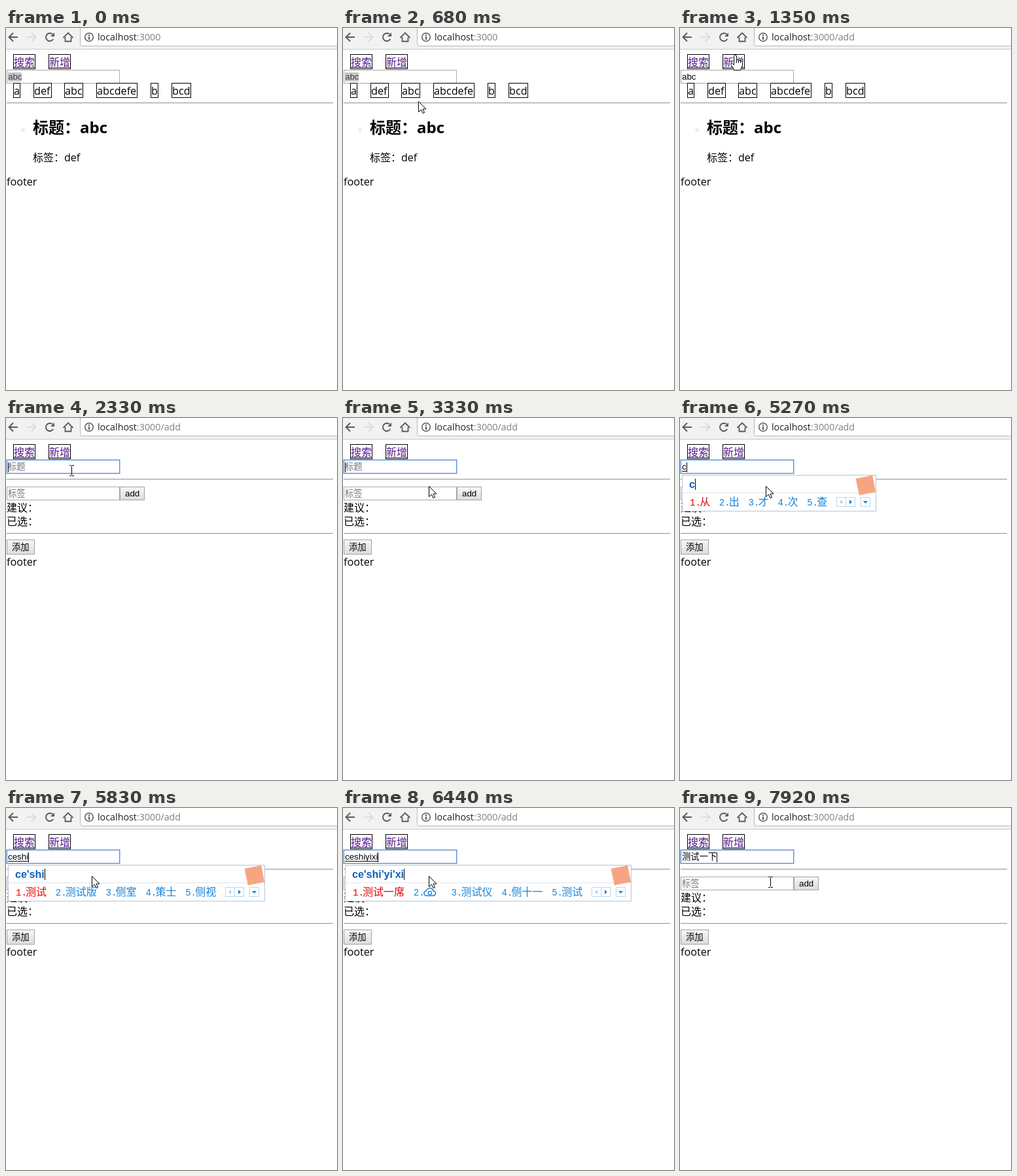
Recreate the animation shown at these times as an HTML page with a canvas. Size 506 by 554 pixels, loop 8000 ms.

```html
<!DOCTYPE html>
<html lang="zh-CN">
<head>
<meta charset="utf-8">
<style>
html, body { margin: 0; width: 100%; height: 100%; overflow: hidden; background: #fff; }
canvas { display: block; }
</style>
</head>
<body>
<canvas id="stage" width="506" height="554"></canvas>
<script>
const ctx = document.getElementById('stage').getContext('2d');
const LOOP = 8000;
const UI = '"Open Sans", "Noto Sans CJK SC", "Noto Sans CJK", sans-serif';
const FIELD = '"Liberation Sans", "Noto Sans CJK SC", "Noto Sans CJK", sans-serif';
const BODY = '16.2px ' + UI, CJK = '16px ' + UI, INPUT = '13.333px ' + FIELD;
const BLUE = '#1583d8';

// Event times in ms
const PRESS = 1220, ROUTE = 1350, FORM = 1390, FOCUS = 2330, TYPE = 5270, COMMIT = 6750;

// Start time, pinyin, candidates ("~" is the cloud icon)
const typing = [
  [TYPE, 'c', '从 出 才 次 查'],
  [5420, 'ce', '测 侧 册 策 厕'],
  [5600, "ce's", '测试 厕所 测算 侧身 测速'],
  [5720, "ce'sh", '测试 侧身 测绘 策试 厕所'],
  [5830, "ce'shi", '测试 测试版 侧室 策士 侧视'],
  [6060, "ce'shi'y", '测试仪 测试员 测试页 测试用 测试源'],
  [6210, "ce'shi'yi", '测试一 ~ 测试仪 侧十一 测试'],
  [6330, "ce'shi'yi'x", '测试一下 ~ 测试仪 侧十一 测试'],
  [6440, "ce'shi'yi'xi", '测试一席 ~ 测试仪 侧十一 测试'],
  [6520, "ce'shi'yi'xia", '测试一下 测试以下 测试 策士 侧视'],
];

// Pointer path: time, x, y
const path = [
  [160, 415, 545], [400, 300, 345], [650, 128, 125], [800, 66, 60], [960, 77, 43],
  [1029, 77, 43], [1030, 84, 41], [1769, 84, 41], [1900, 92, 58], [2060, 99, 78],
  [2180, 101, 83], [2320, 100, 80], [2639, 100, 80], [2780, 137, 101], [2870, 131, 104],
  [7719, 131, 104], [7910, 138, 113],
];

function text(str, x, y, font = BODY, color = '#000') {
  ctx.font = font;
  ctx.fillStyle = color;
  ctx.fillText(str, x, y);
  return ctx.measureText(str).width;
}

function rect(x, y, w, h, color) {
  ctx.fillStyle = color;
  ctx.fillRect(x, y, w, h);
}

function frame(x, y, w, h, color) {
  ctx.strokeStyle = color;
  ctx.lineWidth = 1;
  ctx.strokeRect(x + .5, y + .5, w - 1, h - 1);
}

function shape(points, fill, stroke, width = 1) {
  ctx.beginPath();
  for (let i = 0; i < points.length; i += 2) ctx.lineTo(points[i], points[i + 1]);
  if (fill) { ctx.closePath(); ctx.fillStyle = fill; ctx.fill(); }
  if (stroke) { ctx.strokeStyle = stroke; ctx.lineWidth = width; ctx.stroke(); }
}

function arc(x, y, r, from, to, color, width) {
  ctx.beginPath();
  ctx.arc(x, y, r, from, to);
  ctx.strokeStyle = color;
  ctx.lineWidth = width;
  ctx.stroke();
}

function rule(y) {
  rect(1, y, 499, 1, '#9a9a9a');
  rect(1, y + 1, 499, 1, '#eee');
}

function input(y, focused) {
  rect(1, y, 173, 21, '#fff');
  if (focused) frame(0, y - 1, 175, 23, '#b9d0f2');
  frame(1, y, 173, 21, focused ? '#5b8fdc' : '#a9a9a9');
}

function button(label, x, y, w, h) {
  const g = ctx.createLinearGradient(0, y, 0, y + h);
  g.addColorStop(0, '#f7f7f7');
  g.addColorStop(1, '#dcdcdc');
  rect(x, y, w, h, g);
  frame(x, y, w, h, '#a3a3a3');
  text(label, x + 8, y + h / 2 + 4.5, INPUT);
}

function arrowIcon(x, dir, color) {
  shape([x - 7 * dir, 14, x + 6 * dir, 14], null, color, 2);
  shape([x, 7.5, x + 6.5 * dir, 14, x, 20.5], null, color, 2);
}

function browserBar(t) {
  const ink = '#5a5a5a';
  rect(0, 0, 506, 32, '#f1f2f2');
  rect(0, 32, 506, 1, '#c9c9c9');
  ctx.beginPath();
  ctx.roundRect(113.5, -4.5, 420, 32, 3);
  ctx.fillStyle = '#fff';
  ctx.fill();
  ctx.strokeStyle = '#b8b8b8';
  ctx.lineWidth = 1;
  ctx.stroke();
  arrowIcon(11, -1, ink);
  arrowIcon(39, 1, '#d9dce1');
  arc(67, 14, 6, .5, 5.4, ink, 2);
  shape([74, 7, 74, 13, 68, 13], ink);
  shape([87.5, 15, 95, 7.5, 102.5, 15], null, ink, 1.8);
  shape([90.5, 14, 90.5, 20.5, 99.5, 20.5, 99.5, 14], null, ink, 1.8);
  arc(127, 14, 6.3, 0, 7, ink, 1.5);
  rect(126, 10, 2, 2, ink);
  rect(126, 13, 2, 5, ink);
  const w = text('localhost', 140, 19, '14.3px ' + UI, '#222');
  text(t < ROUTE ? ':3000' : ':3000/add', 140 + w, 19, '14.3px ' + UI, '#808080');
}

function navLink(label, x) {
  frame(x, 40, 34, 23, '#000');
  text(label, x + 1, 58, CJK, '#551a8b');
  rect(x + 1, 60, 32, 1, '#551a8b');
}

function searchPage(t) {
  input(64, false);
  if (t < PRESS) rect(3, 68, 21, 14, '#c8c8c8');
  text('abc', 3, 79, INPUT, t < PRESS ? '#43394a' : '#000');
  const tags = [['a', 11, 11], ['def', 42, 28], ['abc', 89, 29], ['abcdefe', 138, 63], ['b', 221, 12], ['bcd', 253, 30]];
  for (const [label, x, w] of tags) {
    frame(x, 84, w, 23, '#000');
    text(label, x + 1, 102);
  }
  rule(114);
  ctx.beginPath();
  ctx.arc(26, 156, 3, 0, 7);
  ctx.fill();
  text('标题：abc', 41, 161, 'bold 24px ' + UI);
  text('标签：def', 41, 204, CJK);
  text('footer', 1, 241);
}

function caret(x, top, bottom, color = '#000') {
  rect(Math.round(x), top, 1, bottom - top, color);
}

function addPage(t, step) {
  const focused = t >= FOCUS;
  input(64, focused);
  rule(93);
  input(105, false);
  text('标签', 3, 120, INPUT, '#757575');
  button('add', 174, 105, 38, 21);
  text('建议：', 1, 143, CJK);
  text('已选：', 1, 164, CJK);
  rule(176);
  button('添加', 1, 186, 43, 23);
  text('footer', 1, 226);

  const value = t >= COMMIT ? '测试一下' : step ? step[1].replaceAll("'", '') : '';
  const w = value ? text(value, 3, 79, INPUT) : 0;
  if (!value) text('标题', 3, 79, INPUT, '#757575');
  if (step) rect(3, 81, w, 1, '#000');
  const blinkStart = t >= COMMIT ? 6806 : 2322;
  const lit = step || Math.floor(Math.max(0, t - blinkStart) / 504) % 2 === 0;
  if (focused && lit) caret(3 + w, 68, 83);
}

function cloud(x) {
  ctx.beginPath();
  ctx.arc(x + 6, 130.5, 3.8, 1.57, 4.4);
  ctx.arc(x + 11, 127.5, 5, 3.6, 6);
  ctx.arc(x + 16, 130.5, 3.8, 4.9, 1.57);
  ctx.closePath();
  ctx.strokeStyle = BLUE;
  ctx.lineWidth = 1.5;
  ctx.stroke();
  arc(x + 11, 130, 2.6, 0, 7, BLUE, 1.3);
}

function imePopup([, pinyin, list]) {
  const words = list.split(' ');
  const wordWidth = w => w === '~' ? 29 : 16 * w.length;
  const pager = Math.round(15 + words.reduce((sum, w) => sum + 28.8 + wordWidth(w), 0));
  const right = pager + 61;
  rect(3, 87, right - 3, 56, '#fff');
  frame(3, 87, right - 3, 56, '#b3c6d9');
  rect(4, 114, right - 5, 1, '#dfe6ec');
  const w = text(pinyin, 14, 107, 'bold 16px ' + FIELD, '#0b60c2');
  caret(14 + w, 93, 110);

  ctx.save();
  ctx.translate(right - 16, 103);
  ctx.rotate(-.2);
  rect(-13, -13, 26, 26, '#f6a583');
  ctx.restore();

  let x = 15;
  words.forEach((word, i) => {
    const color = i ? BLUE : '#e60000';
    text(i + 1 + '.', x, 134, '14px "Liberation Mono", monospace', color);
    if (word === '~') cloud(x + 14);
    else text(word, x + 15, 134, CJK, color);
    x += 28.8 + wordWidth(word);
  });

  for (const dx of [0, 14, 37]) frame(pager + dx, 121, 15, 15, '#b9d9ee');
  shape([pager + 9, 125, pager + 9, 132, pager + 5, 128.5], '#a9d0ee');
  shape([pager + 20, 125, pager + 20, 132, pager + 24, 128.5], BLUE);
  shape([pager + 41, 127, pager + 48, 127, pager + 44.5, 131], BLUE);
}

function pointer(t) {
  if (t < path[0][0]) return;
  const i = path.findLastIndex(p => p[0] <= t);
  const [t0, x0, y0] = path[i], [t1, x1, y1] = path[i + 1] || [LOOP, x0, y0];
  const k = (t - t0) / (t1 - t0);
  const x = Math.round(x0 + (x1 - x0) * k), y = Math.round(y0 + (y1 - y0) * k);
  const overLink = x >= 65 && x < 99 && y >= 40 && y < 64;
  const overInput = x < 174 && (y >= 64 && y < 86 || t >= FORM && y >= 105 && y < 126);

  ctx.save();
  ctx.translate(x + .5, y + .5);
  if (overLink) {
    shape([-2, 1, -1, 0, 1, 0, 2, 1, 2, 8, 4, 7, 6, 8.5, 8, 8, 10, 9.5, 11, 11, 11, 16, 9, 20, 8, 23,
      -2, 23, -3, 20, -6, 16, -7, 13, -5, 12, -2, 15, -2, 1], '#fff', '#000');
    shape([2, 8, 2, 12], null, '#000');
    shape([5, 8, 5, 12], null, '#000');
    shape([8, 8, 8, 12], null, '#000');
  } else if (overInput) {
    shape([0, -7, 0, 7], null, '#000');
    for (const end of [-8, 8]) {
      shape([-3.5, end, -.5, end], null, '#000');
      shape([.5, end, 3.5, end], null, '#000');
    }
  } else {
    shape([0, 0, 0, 16, 4, 12.5, 6.5, 18, 9, 17, 6.5, 11.5, 11.5, 11.5, 0, 0], '#fff', '#000');
  }
  ctx.restore();
}

function draw() {
  const t = performance.now() % LOOP;
  const step = t < COMMIT ? typing.findLast(s => s[0] <= t) : null;
  rect(0, 0, 506, 554, '#fff');
  browserBar(t);
  navLink('搜索', 11);
  navLink('新增', 65);
  if (t < FORM) searchPage(t);
  else addPage(t, step);
  if (step) imePopup(step);
  pointer(t);
  requestAnimationFrame(draw);
}
draw();
</script>
</body>
</html>
```
